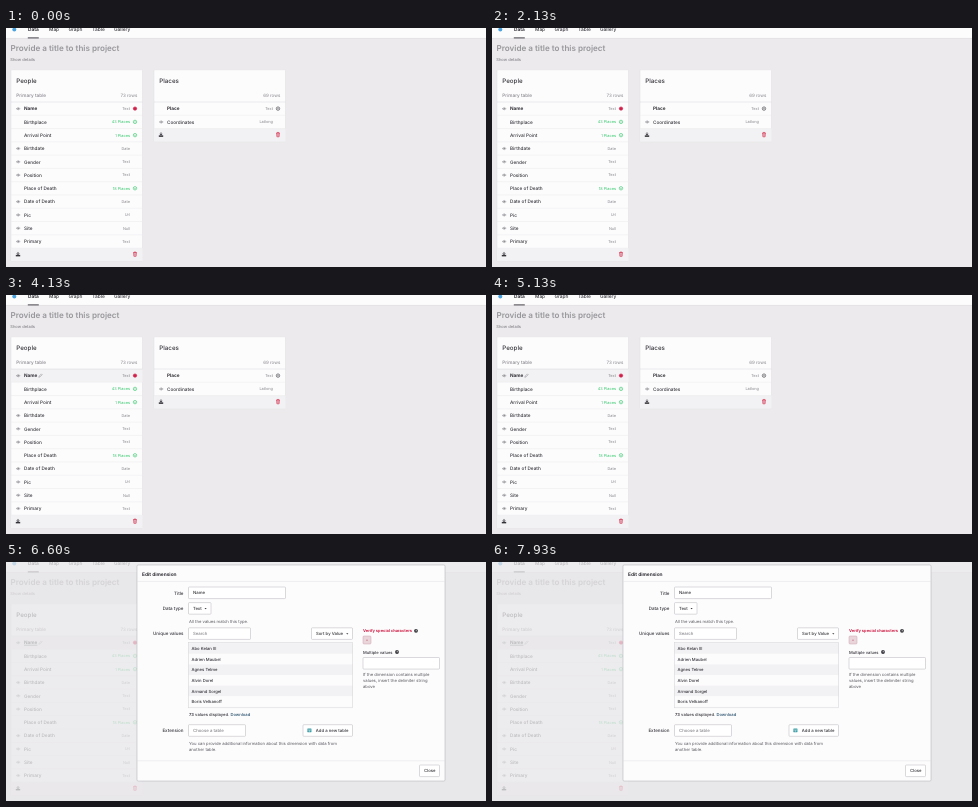
Recreate the animation shown at these times as an HTML page. Size 480 px wide and 239 px high, loop 8000 ms.

```html
<!DOCTYPE html>
<html lang="en">
<head>
<meta charset="utf-8">
<title>Project data</title>
<style>
html, body { margin: 0; width: 100%; height: 100%; overflow: hidden; background: #eceaec; }
svg { display: block; width: 100vw; height: 100vh; font-family: Inter, Roboto, sans-serif; text-rendering: geometricPrecision; }
</style>
</head>
<body>
<svg id="stage" viewBox="0 0 480 239"></svg>
<script>
const LOOP = 8000, HOVER = 2500, UNDERLINE = 5800, OPEN = 6600;
const INK = '#333238', GREY = '#85848a', GREEN = '#2fc768', RED = '#d5304f';
const PAPER = '#fdfcfd', SHADE = '#f2f1f3', RULE = '#e9e8ea', EDGE = '#b4b3b8';

const text = (x, y, s, size = 4.7, fill = INK, weight = 450, anchor = 'start') =>
  `<text x="${x}" y="${y}" font-size="${size}" fill="${fill}" font-weight="${weight}" text-anchor="${anchor}">${s}</text>`;
const rect = (x, y, w, h, fill, stroke = 'none', r = 0) =>
  `<rect x="${x}" y="${y}" width="${w}" height="${h}" fill="${fill}" stroke="${stroke}" stroke-width=".5" rx="${r}"/>`;
const path = (d, stroke, width = .6, fill = 'none') =>
  `<path d="${d}" stroke="${stroke}" stroke-width="${width}" fill="${fill}"/>`;
const circle = (x, y, r, fill, stroke = 'none') =>
  `<circle cx="${x}" cy="${y}" r="${r}" fill="${fill}" stroke="${stroke}" stroke-width=".6"/>`;
const group = (id, body) => `<g id="${id}">${body}</g>`;

const eye = (x, y) => path(`M${x - 2} ${y}q2-2.4 4 0q-2 2.4-4 0`, GREY, .5) + circle(x, y, .8, GREY);
const download = (x, y) => path(`M${x} ${y - 2.3}v2.6m-1.2-1.2l1.2 1.3l1.2-1.3`, INK, .8) +
  rect(x - 2.2, y + .6, 4.4, 1.5, INK);
const trash = (x, y) => path(`M${x - 1.9} ${y - 1.6}h3.8m-2.6 0v-.7h1.4v.7m-2 0l.2 3.6h2.2l.2-3.6m-1.3 .8v2`, RED, .7);
const caret = (x, y) => path(`M${x - 1.1} ${y - .6}h2.2l-1.1 1.3z`, 'none', 0, INK);
const help = (x, y) => circle(x, y, 1.9, INK) + text(x, y + 1.1, '?', 3, '#fff', 700, 'middle');

const ROW = 13.28, TOP = 74;

// rows: [label, type, has eye, marker colour, marker filled]
function card(x, title, note, count, rows, under = '') {
  const foot = TOP + rows.length * ROW;
  let s = rect(x, 41.8, 131.5, foot + 13 - 41.8, PAPER, '#dedce0', .8) + under +
    text(x + 5.3, 54.6, title, 6.2, INK, 500) +
    text(x + 5.3, 68.5, note, 4.7, GREY) +
    text(x + 126.3, 68.5, count, 4.5, GREY, 400, 'end');
  rows.forEach(([label, type, seen, mark, solid], i) => {
    const y = TOP + i * ROW, mid = y + 6.7;
    s += path(`M${x} ${y}h131.5`, i ? RULE : '#d3d2d6', .5);
    if (seen) s += eye(x + 7.2, mid);
    s += text(x + 13, mid + 1.7, label, 4.7, INK, i ? 450 : 700);
    s += text(x + 119, mid + 1.3, type, 3.9, mark === GREEN ? GREEN : GREY, 400, 'end');
    if (mark) {
      s += circle(x + 124, mid - .1, 1.7, solid ? mark : 'none', mark);
      if (!solid) s += path(`M${x + 123.1} ${mid}h1.8`, mark, .5);
    }
  });
  return s + rect(x, foot, 131.5, 13, SHADE) + path(`M${x} ${foot}h131.5`, RULE, .5) +
    download(x + 7, foot + 6.2) + trash(x + 124, foot + 6.2);
}

function page() {
  const tabs = [[22, 'Data'], [43, 'Map'], [62.4, 'Graph'], [86.3, 'Table'], [108, 'Gallery']];
  const people = [
    ['Name', 'Text', 1, '#d0204a', 1],
    ['Birthplace', '43 Places', 0, GREEN],
    ['Arrival Point', '1 Places', 0, GREEN],
    ['Birthdate', 'Date', 1], ['Gender', 'Text', 1], ['Position', 'Text', 1],
    ['Place of Death', '18 Places', 0, GREEN],
    ['Date of Death', 'Date', 1], ['Pic', 'Url', 1], ['Site', 'Null', 1], ['Primary', 'Text', 1]
  ];
  const places = [['Place', 'Text', 0, INK], ['Coordinates', 'Latlong', 1]];
  const hover = group('hover', rect(5, TOP, 131.5, ROW, SHADE) +
    path('M32.8 82.3l.4-1.2l2.2-2.2l.8.8l-2.2 2.2z', GREY, .5));
  return rect(0, 0, 480, 10.2, PAPER) + path('M0 10.4h480', '#d6d4d8', .5) +
    path('M21.8 9.9h11', INK, .9) + circle(8.3, 1.6, 2, '#4aa3df') +
    tabs.map(([x, s], i) => text(x, 2.7, s, 4.8, INK, i ? 450 : 700)).join('') +
    text(4.5, 22.7, 'Provide a title to this project', 8.1, '#98979c', 600) +
    text(4.3, 32.5, 'Show details', 4.05, GREY) +
    card(5, 'People', 'Primary table', '73 rows', people, hover) +
    card(148, 'Places', '', '69 rows', places) +
    group('line', path('M18 83.2h13.4', INK, .6));
}

function modal() {
  const label = (y, s) => text(177.5, y, s, 4.5, INK, 450, 'end');
  const field = (x, y, w, s = '', fill = INK) =>
    rect(x, y, w, 11.6, '#fff', EDGE, .7) + text(x + 4.5, y + 7.4, s, 4.3, fill);
  const button = (x, y, w, s, dx = 4.5) =>
    rect(x, y, w, 11.6, '#fff', EDGE, .8) + text(x + dx, y + 7.4, s, 4.25, INK, 500);
  const note = (x, y, s) => text(x, y, s, 4.2, '#55545a', 400);
  const names = ['Abo Kelan III', 'Adrien Maubel', 'Agnes Telme', 'Alvin Dorel', 'Armand Sorgel', 'Boris Velkanoff'];
  const step = 10.6;
  const list = names.map((s, i) =>
    rect(182.5, 81.2 + i * step, 164, step, i % 2 ? PAPER : SHADE) +
    text(185.5, 88.1 + i * step, s, 4.2)).join('');

  return rect(0, 0, 480, 239, 'rgba(232,230,233,.76)') +
    rect(131, 3, 308, 216, PAPER, '#aaa9ae', 1) +
    text(136, 13.7, 'Edit dimension', 4.8, INK, 700) +
    path('M131 19.4h308M131 198.8h308', '#dddce0', .5) +
    label(32.6, 'Title') + field(182.5, 25, 97, 'Name') +
    label(48, 'Data type') + button(182.5, 40.6, 22.5, 'Text') + caret(199.6, 46.6) +
    note(183, 60.5, 'All the values match this type.') +
    label(73, 'Unique values') + field(182.5, 65.8, 62, 'Search', GREY) +
    button(305.5, 65.8, 41, 'Sort by Value') + caret(341.3, 71.8) +
    list + rect(182.5, 80.5, 164, 65.3, 'none', '#d0cfd4') +
    text(183, 154, '<tspan font-weight="600">73</tspan> values displayed. <tspan font-weight="500" fill="#1f4a66">Download</tspan>', 4.15) +
    label(170, 'Extension') + field(182.5, 162.7, 57, 'Choose a table', GREY) +
    button(297, 162.7, 49.5, 'Add a new table', 12.8) +
    rect(301.3, 166.6, 4.2, 3.6, '#3f9fa8', 'none', .4) + path('M301.3 168h4.2m-2.1 0v2.2', '#fff', .4) +
    note(183, 182.5, 'You can provide additional information about this dimension with data from') +
    note(183, 188.8, 'another table.') +
    text(357, 70.3, 'Verify special characters', 4.03, '#cf2148', 700) + help(410, 68.8) +
    rect(357, 74, 8, 8, '#ead5db', '#c9a0ac', 1) + path('M360.2 78.2h1.6', '#a5455f', .6) +
    text(357, 91.5, 'Multiple values', 4.1, INK, 500) + help(391, 90) +
    field(357, 95.5, 76.5) +
    ['If the dimension contains multiple', 'values, insert the delimiter string', 'above']
      .map((s, i) => note(357, 113.6 + i * 6.3, s)).join('') +
    button(413.5, 203, 20, 'Close');
}

const $ = id => document.getElementById(id);
$('stage').innerHTML = page() + group('modal', modal());

const show = (id, on) => $(id).setAttribute('visibility', on ? 'visible' : 'hidden');
function draw() {
  const t = performance.now() % LOOP;
  show('hover', t >= HOVER);
  show('line', t >= UNDERLINE);
  show('modal', t >= OPEN);
  requestAnimationFrame(draw);
}
draw();
</script>
</body>
</html>
```
